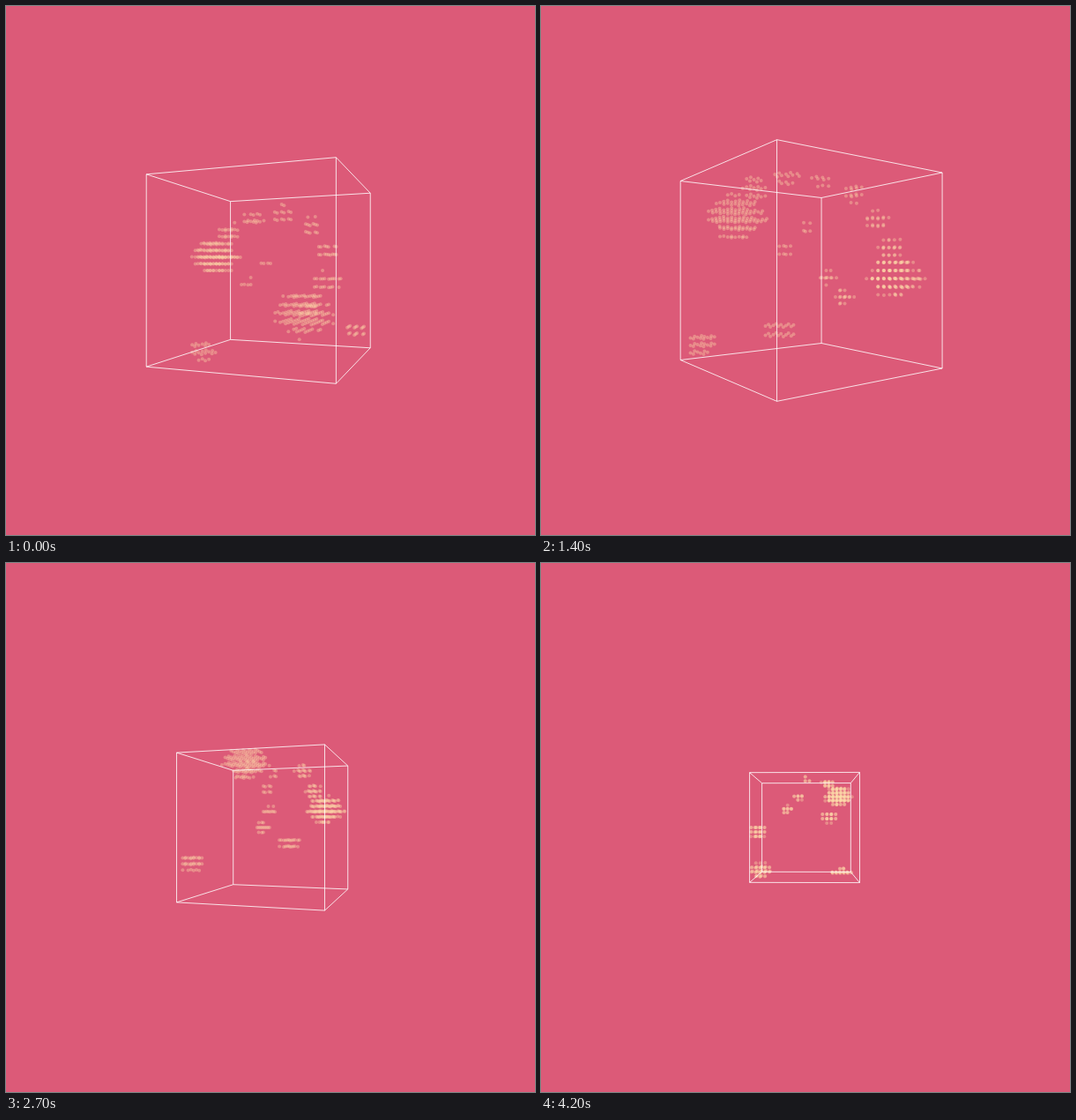
An HTML page with a canvas for the animation above (4250 ms loop, 600 by 600 pixels).

```html
<!DOCTYPE html>
<html lang="en">
<head>
<meta charset="utf-8">
<title>Point cloud cube</title>
<style>
  html, body { margin: 0; width: 100%; height: 100%; overflow: hidden; background: #dc5a78; }
  canvas { display: block; width: 600px; height: 600px; }
</style>
</head>
<body>
<canvas id="stage" width="600" height="600"></canvas>
<script>
const ctx = document.getElementById('stage').getContext('2d');
const LOOP = 4250, STEP = 50;
const FOCAL = 300 / Math.tan(Math.PI / 6); // 60 degree field of view
const CELLS = 24;
const DRIFT = 0.13; // cube sides per second, upwards
const SQUASH = 0.75; // clump height relative to width
const RAD = Math.PI / 180;

// Camera stops: time in ms, yaw in degrees, distance in cube sides
const STOPS = [
  [0, -20.8, 2.67], [550, -5.7, 2.31], [850, 6.9, 2.222], [1400, 36.1, 2.45],
  [2150, 61.5, 3.018], [2725, 73, 3.41], [3500, 88.1, 4.525], [3850, 89, 4.66]
];

// Clumps on an arch that climbs from the left, crosses the top and comes
// forward down the right; its two ends are the heaviest.
function archClumps(count) {
  return Array.from({ length: count }, (_, i) => {
    const s = i / (count - 1), angle = (165 - 205 * s) * RAD;
    return {
      x: 0.4 * Math.cos(angle),
      y: -0.33 * Math.sin(angle),
      z: 0.05 - 0.4 * s * s,
      r: 0.07 + 0.075 * Math.abs(2 * s - 1) ** 6
    };
  });
}

// Loose clumps (x, y, z) that grow with depth below the arch
const looseClumps = [
  [-.02, -.04, -.03], [-.15, .08, -.01], [.21, .22, .07], [.46, .35, .22],
  [-.32, .455, -.23], [-.4, .59, .44], [-.35, .95, .42], [.45, 1.07, -.39]
].map(([x, y, z]) => ({ x, y, z, r: 0.05 + 0.06 * Math.max(0, y) }));

const clumps = [...archClumps(8), ...looseClumps];

const slope = (i, k) => (STOPS[i + 1][k] - STOPS[i][k]) / (STOPS[i + 1][0] - STOPS[i][0]);

function tangent(i, k) {
  if (i === 0) return slope(0, k);
  if (i === STOPS.length - 1) return 0;
  const a = slope(i - 1, k), b = slope(i, k);
  return a * b > 0 ? 2 * a * b / (a + b) : 0;
}

// Monotone cubic through the camera stops
function cameraValue(time, k) {
  const t = Math.min(time, STOPS[STOPS.length - 1][0]);
  let i = 0;
  while (i < STOPS.length - 2 && t >= STOPS[i + 1][0]) i++;
  const span = STOPS[i + 1][0] - STOPS[i][0];
  const s = (t - STOPS[i][0]) / span, r = 1 - s;
  return STOPS[i][k] * r * r * (1 + 2 * s) + STOPS[i + 1][k] * s * s * (3 - 2 * s)
    + span * s * r * (r * tangent(i, k) - s * tangent(i + 1, k));
}

function makeProjection(t) {
  const yaw = cameraValue(t, 1) * RAD, distance = cameraValue(t, 2);
  const c = Math.cos(yaw), s = Math.sin(yaw);
  return (x, y, z) => {
    const scale = FOCAL / (distance + x * s + z * c);
    return [300 + (x * c - z * s) * scale, 300 + y * scale];
  };
}

// The sines roughen the outline of every clump.
function isFilled(x, y, z, nearby) {
  const limit = 1 + 0.25 * Math.sin(47 * x + 9 * y) * Math.sin(43 * z + 2) + 0.15 * Math.sin(61 * y);
  return nearby.some(b =>
    Math.hypot(x - b.x, (y - b.y) / SQUASH, z - b.z) ** 2 < limit * b.r * b.r);
}

function drawPoints(t, project) {
  const shift = DRIFT * t / 1000;
  const grid = Array.from({ length: CELLS + 1 }, (_, i) => i / CELLS - 0.5);
  ctx.fillStyle = 'rgba(255, 224, 172, 0.36)';
  for (const y of grid) {
    const fieldY = y + shift;
    const nearby = clumps.filter(b => Math.abs(fieldY - b.y) < b.r);
    if (!nearby.length) continue;
    for (const x of grid) {
      for (const z of grid) {
        if (!isFilled(x, fieldY, z, nearby)) continue;
        ctx.beginPath();
        ctx.arc(...project(x, y, z), 2, 0, 2 * Math.PI);
        ctx.fill();
      }
    }
  }
}

function drawCube(project) {
  const corners = [[-.5, -.5], [.5, -.5], [.5, .5], [-.5, .5]];
  const line = (a, b) => { ctx.moveTo(...a); ctx.lineTo(...b); };
  ctx.strokeStyle = 'rgba(255, 255, 255, 0.82)';
  ctx.lineWidth = 1;
  ctx.beginPath();
  corners.forEach(([x, z], i) => {
    const [nextX, nextZ] = corners[(i + 1) % 4];
    line(project(x, -.5, z), project(x, .5, z));
    for (const y of [-.5, .5]) line(project(x, y, z), project(nextX, y, nextZ));
  });
  ctx.stroke();
}

function draw(t) {
  const project = makeProjection(t);
  ctx.fillStyle = '#dc5a78';
  ctx.fillRect(0, 0, 600, 600);
  drawPoints(t, project);
  drawCube(project);
}

const start = performance.now();
let shown = -1;
function tick() {
  const elapsed = Math.max(0, performance.now() - start) % LOOP;
  const t = Math.floor(elapsed / STEP) * STEP;
  if (t !== shown) draw(shown = t);
  requestAnimationFrame(tick);
}
tick();
</script>
</body>
</html>
```
